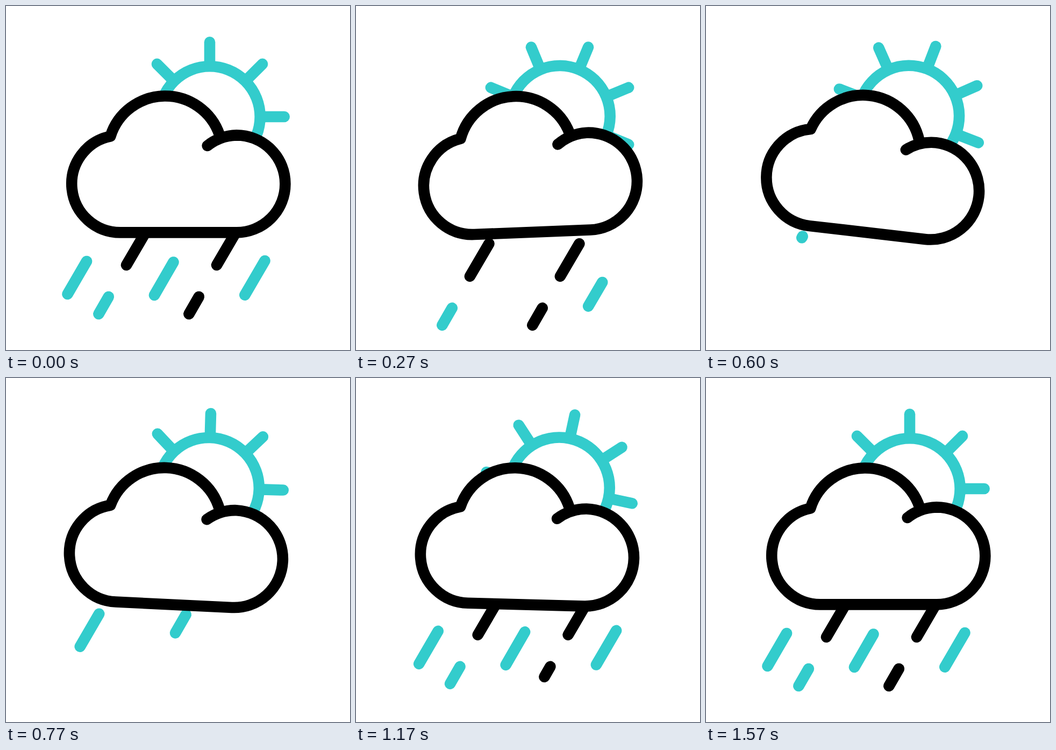
Recreate the animation shown at these times as an HTML page. Size 640 by 640 pixels, loop 1.63 s.

```html
<!DOCTYPE html>
<html lang="en">
<head>
<meta charset="utf-8">
<title>Sun and rain</title>
<style>
  html, body { margin: 0; width: 100%; height: 100%; overflow: hidden; background: #fff; }
  svg { display: block; width: 100vw; height: 100vh; }
</style>
</head>
<body>
<svg id="stage" viewBox="0 0 640 640" fill="none" stroke-width="20.6" stroke-linecap="round" stroke-linejoin="round">
  <g id="sun" stroke="#33cccc">
    <circle cx="379" cy="206" r="93.7"/>
  </g>
  <path id="cloud" fill="#fff" stroke="#000" d="M374.7 260 A90.5 90.5 0 0 1 429 240.4 A90.5 90.5 0 0 1 429 421.4 H213 A90.5 90.5 0 0 1 194.3 242.3 A106.8 106.8 0 0 1 397.3 240"/>
  <g id="rain"></g>
</svg>
<script>
const NS = 'http://www.w3.org/2000/svg';
const LOOP = 1630, LAST = 47;
const SWITCH = 17;   // step at which the old rain gives way to the new
const TRIM = 4.5;    // steps a drop needs to draw or erase itself
const CYAN = '#33cccc', BLACK = '#000';

const $ = id => document.getElementById(id);
const stage = $('stage'), sun = $('sun'), cloud = $('cloud'), rain = $('rain');

function set(el, attrs) {
  for (const name in attrs) el.setAttribute(name, attrs[name]);
  return el;
}
function addLine(parent, attrs) {
  return parent.appendChild(set(document.createElementNS(NS, 'line'), attrs));
}

const clamp = x => Math.max(0, Math.min(1, x));
const smooth = x => { x = clamp(x); return x * x * (3 - 2 * x); };
const mix = (a, b, p) => a + (b - a) * p;

// Smooth curve through [step, value] keys that never overshoots them
function curve(keys) {
  const n = keys.length;
  const slope = i => (keys[i + 1][1] - keys[i][1]) / (keys[i + 1][0] - keys[i][0]);
  const tangent = keys.map((key, i) => {
    if (i === 0) return slope(0);
    if (i === n - 1) return 0;
    const a = slope(i - 1), b = slope(i);
    return a * b <= 0 ? 0 : 2 * a * b / (a + b);
  });
  return k => {
    let i = 0;
    while (i < n - 2 && k >= keys[i + 1][0]) i++;
    const [k0, v0] = keys[i], [k1, v1] = keys[i + 1];
    const h = k1 - k0, x = clamp((k - k0) / h), y = 1 - x;
    return v0 * y * y * (1 + 2 * x) + v1 * x * x * (3 - 2 * x)
      + h * x * y * (tangent[i] * y - tangent[i + 1] * x);
  };
}

const sunTurn = curve([[0, 0], [8, 67.5], [13, 116], [18, 158.9], [24.5, 180], [29, 169.1], [35, 122.9], [47, 0]]);
const cloudTilt = curve([[0, 0], [4, 2.5], [8, -2.25], [13, -14], [18, 6.6], [19.5, 7.2], [27.5, -3.7], [29, -3.3], [35, 1.5], [36, 1.6], [43, 0], [47, 0]]);

for (let i = 0; i < 8; i++) {
  addLine(sun, { x1: 379, y1: 108, x2: 379, y2: 67.3, transform: `rotate(${i * 45} 379 206)` });
}

// tail x, tail y, tip x, tip y, colour, step it starts to erase, step it starts to draw
const drops = [
  [150, 475, 114.5, 536, CYAN, 0, 17.8],
  [311.5, 476.5, 276, 538, CYAN, 2.5, 20.5],
  [481.5, 474, 444.3, 537.7, CYAN, 6.65, 23],
  [259.5, 421.4, 224, 482, BLACK, 8, 25],
  [427.5, 421.4, 392, 482, BLACK, 9.5, 28.8],
  [190.8, 541, 172.4, 573, CYAN, 8.2, 30],
  [358.8, 541, 340.4, 573, BLACK, 13, 32.3]
].map(([x1, y1, x2, y2, color, out, back]) =>
  ({ x1, y1, x2, y2, out, back, el: addLine(rain, { stroke: color }) }));

function drawRain(k) {
  const leaving = k < SWITCH;
  const fall = leaving ? 50 * smooth(k / 18) : -48.5 * (1 - smooth((k - 15) / 24.4));
  const lean = leaving ? 0.58 : 0.64;
  set(rain, { transform: `translate(${-fall * lean} ${fall})` });
  for (const d of drops) {
    const from = leaving ? clamp((k - d.out) / TRIM) : 0;
    const to = leaving ? 1 : clamp((k - d.back) / TRIM);
    set(d.el, {
      x1: mix(d.x1, d.x2, from), y1: mix(d.y1, d.y2, from),
      x2: mix(d.x1, d.x2, to), y2: mix(d.y1, d.y2, to),
      visibility: to > from ? 'visible' : 'hidden'
    });
  }
  // New drops emerge from behind the cloud
  const below = leaving ? null : cloud;
  if (rain.nextElementSibling !== below) stage.insertBefore(rain, below);
}

function render(ms) {
  const k = Math.min(LAST, Math.floor((ms % LOOP + 5) * 0.03));
  set(sun, { transform: `rotate(${-sunTurn(k)} 378.05 205.35)` });
  set(cloud, { transform: `rotate(${cloudTilt(k)} 309.3 239.2)` });
  drawRain(k);
}

const start = performance.now();
function tick(now) {
  render(Math.max(0, now - start));
  requestAnimationFrame(tick);
}
render(0);
requestAnimationFrame(tick);
</script>
</body>
</html>
```
